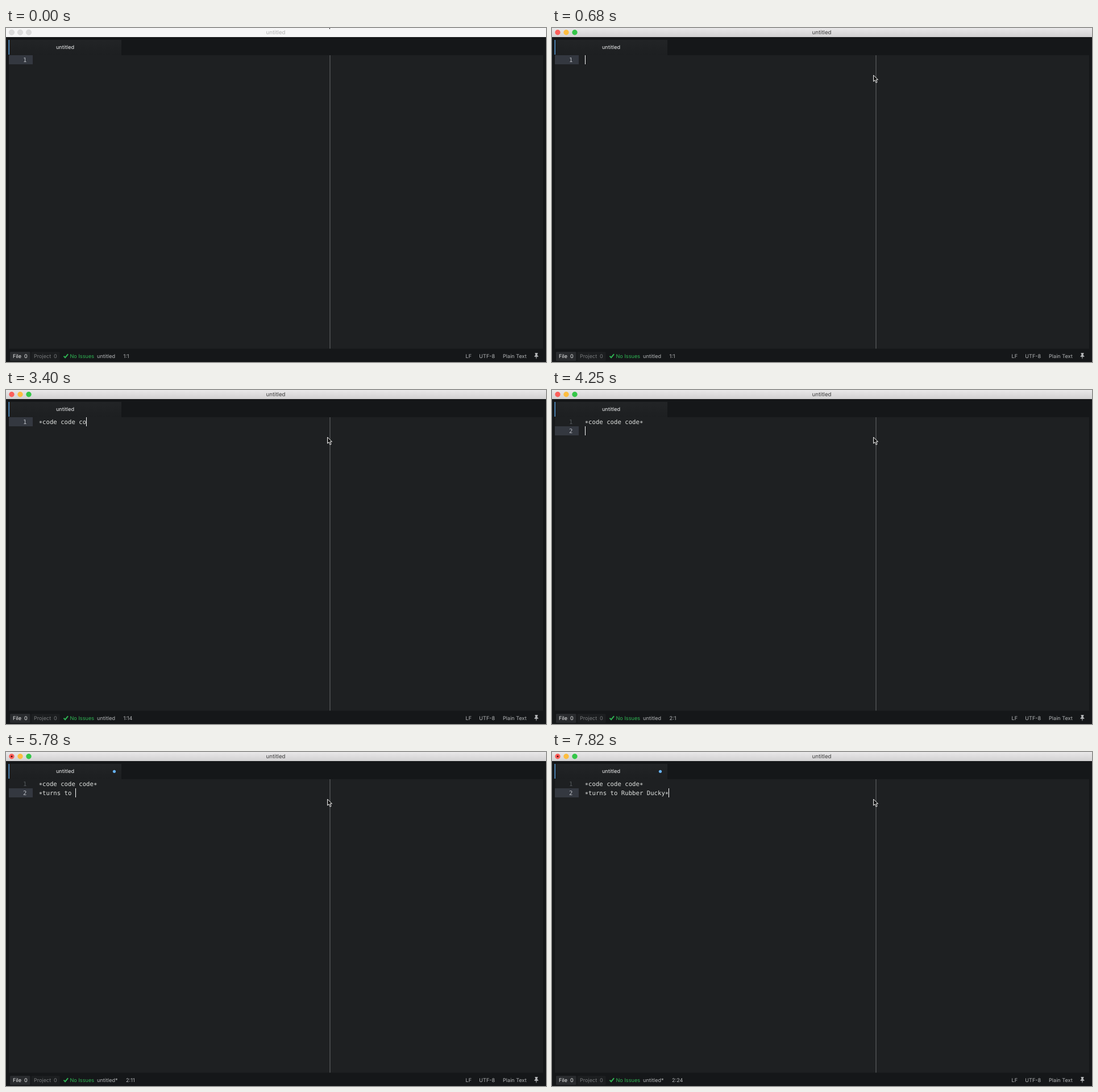
Write an HTML page that moves like this. It is 950 px wide and 589 px high and loops after 7.99 s.

```html
<!DOCTYPE html>
<html lang="en">
<head>
<meta charset="utf-8">
<title>untitled</title>
<style>
  html, body { margin: 0; width: 100%; height: 100%; overflow: hidden; background: #151719; }
  svg { display: block; width: 100%; height: 100%; }
  text { font: 9.15px Inter, "Open Sans", sans-serif; fill: #b4b6b8; white-space: pre; text-rendering: geometricPrecision; }
  .code, .number { font: 10.67px "DejaVu Sans Mono", monospace; }
  .code { fill: #e1e3e1; }
  .number { fill: #55585b; text-anchor: end; }
  .number.active { fill: #b9bcc2; }
  .middle { text-anchor: middle; }
  #windowTitle { font-size: 9.7px; }
  .focused #windowTitle { fill: #3c3c3c; }
  #windowTitle { fill: #b2b2b2; }
  #lights circle { fill: #dcdcdc; stroke: #cfcfcf; stroke-width: .5; }
  .focused #lights circle { fill: var(--on); stroke: none; }
  #titleBar { fill: #f6f6f6; }
  .focused #titleBar { fill: url(#barShade); }
  .edited { visibility: hidden; }
  .modified .edited { visibility: visible; }
</style>
</head>
<body>
<svg id="stage" viewBox="0 0 950 589">
  <defs>
    <linearGradient id="barShade" x2="0" y2="1">
      <stop stop-color="#e9e8e9"/><stop offset="1" stop-color="#d1d0d1"/>
    </linearGradient>
    <linearGradient id="tabShade" x2="0" y2="1">
      <stop stop-color="#222426"/><stop offset="1" stop-color="#1d1f21"/>
    </linearGradient>
  </defs>

  <rect width="950" height="589" fill="#151719"/>
  <rect id="titleBar" width="950" height="16"/>
  <g id="lights">
    <circle cx="10" cy="7.7" r="4.7" style="--on:#fc5f5b"/>
    <circle cx="25" cy="7.7" r="4.7" style="--on:#fdbd3f"/>
    <circle cx="40" cy="7.7" r="4.7" style="--on:#34c748"/>
  </g>
  <circle class="edited" cx="10" cy="7.7" r="1.5" fill="#4c0b0a"/>
  <text id="windowTitle" class="middle" x="474.5" y="11">untitled</text>

  <rect x="5" y="21" width="198" height="27" fill="url(#tabShade)"/>
  <rect x="4.5" y="21" width="1.5" height="26" fill="#5a9fdc"/>
  <text class="middle" x="104" y="37.3" style="fill:#f0f1f2">untitled</text>
  <circle class="edited" cx="190.5" cy="34.3" r="2.6" fill="#66b2f5"/>

  <rect x="5" y="48" width="940" height="517.5" fill="#1e2022"/>
  <rect x="569.5" y="48" width="1" height="517.5" fill="#696b6c"/>
  <rect id="rowMark" x="5" y="48" width="42" height="16" fill="#343840"/>
  <text id="number1" class="number" x="36.3" y="59.5">1</text>
  <text id="number2" class="number" x="36.3" y="75.5">2</text>
  <text id="line1" class="code" x="57.7" y="59.5"></text>
  <text id="line2" class="code" x="57.7" y="75.5"></text>
  <rect id="caret" y="48" width="1" height="16" fill="#fff"/>

  <rect x="7" y="571" width="35.5" height="16" rx="1.5" fill="#292b2e"/>
  <rect x="44.5" y="571" width="50" height="16" rx="1.5" fill="#1c1e20"/>
  <g style="font-weight:500">
    <text x="12" y="582" style="fill:#eceded">File</text>
    <text x="32" y="582" style="fill:#eceded">0</text>
  </g>
  <text x="49" y="582" style="fill:#77797b">Project</text>
  <text x="84" y="582" style="fill:#77797b">0</text>
  <path d="M101.5 578.6l2.6 2.6 5-6" fill="none" stroke="#2fb553" stroke-width="2"/>
  <text x="112.5" y="581.6" style="fill:#2fb553">No Issues</text>
  <text id="fileName" x="160" y="581.6"></text>
  <text id="position" y="581.6"></text>
  <text x="808.5" y="581.6">LF</text>
  <text x="832.3" y="581.6">UTF-8</text>
  <text x="874" y="581.6">Plain Text</text>
  <path d="M930.6 573h5v1.2l-.9.6v2.4l1.7 1.3v1.2h-2.7l-.4 3.8h-.6l-.4-3.8h-2.7v-1.2l1.7-1.3v-2.4l-.7-.6z" fill="#b4b6b8"/>

  <path id="mouse" d="M565.6 83.2v11l2.5-2.3 1.9 4.5 2-.8-1.9-4.4h3.4z" fill="#111" stroke="#fff" stroke-width="1"/>
</svg>
<script>
const LOOP = 7990, STEP = 170, CHAR = 6.42, LEFT = 57.7;
const lines = [
  { text: '*code code code*', start: 1870, typed: [2, 3, 4, 5, 7, 8, 10, 11, 12, 13, 14, 15, 16] },
  { text: '*turns to Rubber Ducky*', start: 4590,
    typed: [1, 2, 3, 5, 6, 7, 9, 10, 10, 11, 13, 14, 16, 17, 18, 20, 21, 22, 22, 23] }
];
const el = id => document.getElementById(id);
const show = (id, on) => el(id).setAttribute('visibility', on ? 'visible' : 'hidden');

function typedCount({ start, typed }, t) {
  if (t < start) return 0;
  return typed[Math.min(Math.floor((t - start) / STEP), typed.length - 1)];
}

// Asterisks sit at the middle of the lowercase letters.
const markup = text => text.replace(/\*/g, '<tspan baseline-shift="-2">*</tspan>');

function draw(t) {
  const focused = t >= 680, modified = t >= 4590;
  const row = t >= 4250 ? 1 : 0;
  const counts = lines.map(line => typedCount(line, t));

  el('stage').setAttribute('class', (focused ? 'focused ' : '') + (modified ? 'modified' : ''));
  lines.forEach((line, i) => {
    el('line' + (i + 1)).innerHTML = markup(line.text.slice(0, counts[i]));
    el('number' + (i + 1)).classList.toggle('active', i === row);
  });
  show('number2', row === 1);
  el('rowMark').setAttribute('y', 48 + 16 * row);

  el('caret').setAttribute('x', Math.round(LEFT + CHAR * counts[row]));
  el('caret').setAttribute('y', 48 + 16 * row);
  show('caret', focused && !(t >= 1190 && t < 1530));

  el('fileName').textContent = modified ? 'untitled*' : 'untitled';
  el('position').setAttribute('x', modified ? 211 : 206.5);
  el('position').textContent = `${row + 1}:${counts[row] + 1}`;
  el('mouse').setAttribute('transform', t < 510 ? 'translate(-1 -94)' : '');
}

let shown = -1;
function tick(now) {
  const t = now % LOOP, slot = Math.floor(t / STEP);
  if (slot !== shown) draw(slot * STEP);
  shown = slot;
  requestAnimationFrame(tick);
}
draw(0);
requestAnimationFrame(tick);
</script>
</body>
</html>
```
